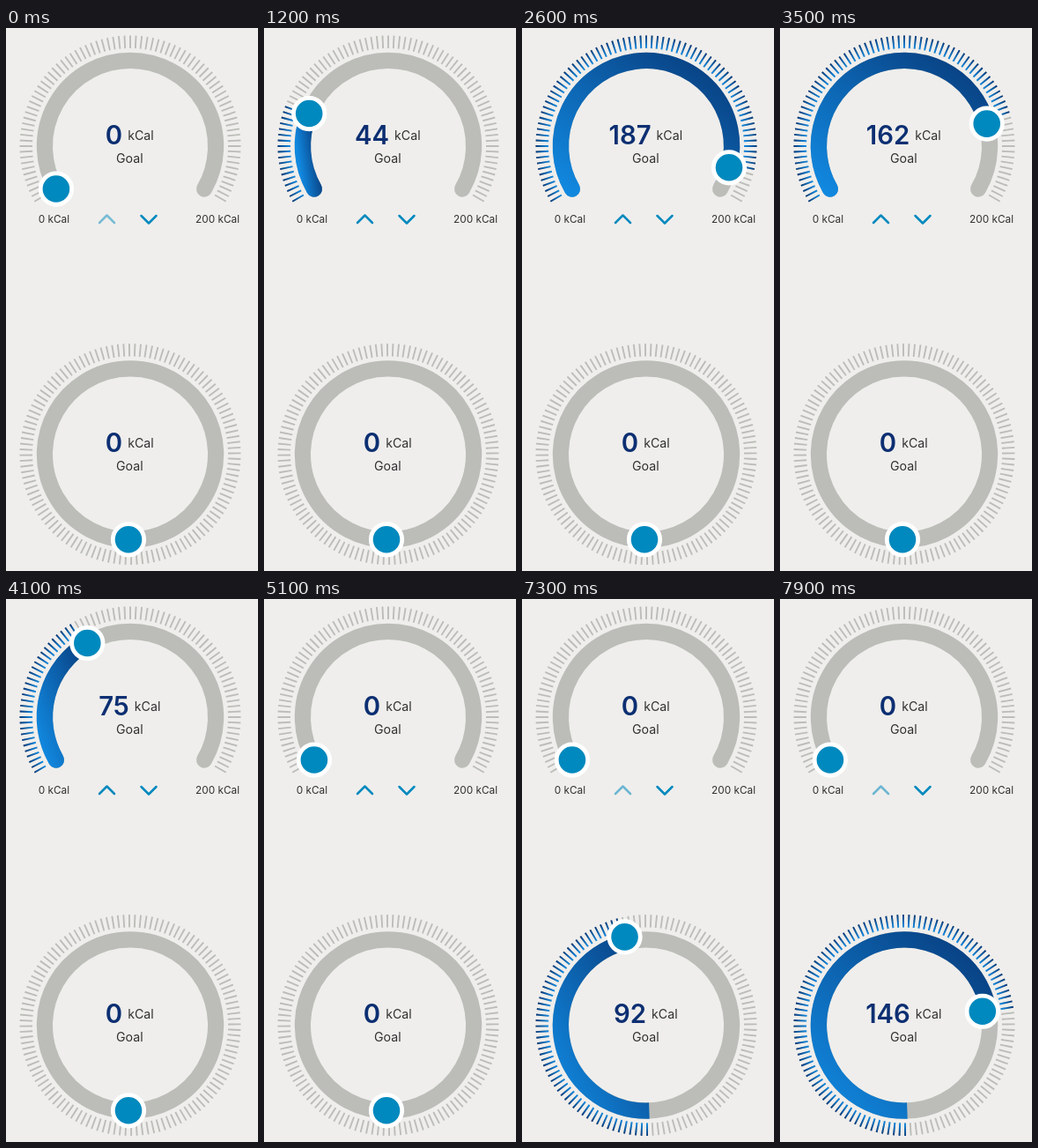
An HTML page for the animation above (8000 ms loop, 286x616 px).

```html
<!DOCTYPE html>
<html lang="en">
<head>
<meta charset="utf-8">
<style>
  html, body { margin: 0; width: 100%; height: 100%; overflow: hidden; background: #efeeec; }
  svg { display: block; width: 286px; height: 616px; font-family: Inter, sans-serif; fill: none; }
  text { fill: #303030; }
  .track { stroke: #bcbdb9; stroke-width: 18.2; }
  .fill { stroke: url(#fill); stroke-width: 18.4; }
  .ticks { stroke: #bcbdb9; stroke-width: 1.9; }
  .lit { stroke-width: 1.9; }
  .knob { fill: #0089be; stroke: #fff; stroke-width: 4.8; }
  .value { font-size: 29.3px; font-weight: 600; fill: #0d2f72; }
  .unit, .label { font-size: 14.2px; }
  .limit { font-size: 11.8px; }
  .arrow { stroke: #0089be; stroke-width: 2.5; stroke-linecap: round; stroke-linejoin: round; }
</style>
</head>
<body>
<svg id="stage" viewBox="0 0 286 616">
  <defs>
    <linearGradient id="fill" x1="0" y1="1" x2="1" y2="0">
      <stop stop-color="#1189e0"/><stop offset="1" stop-color="#083a7a"/>
    </linearGradient>
  </defs>
  <text class="limit" x="36.7" y="221">0 kCal</text>
  <text class="limit" x="265" y="221" text-anchor="end">200 kCal</text>
  <path id="up" class="arrow" d="M106 221l8.5-8.5 8.5 8.5"/>
  <path id="down" class="arrow" d="M153.5 213l8.5 8.5 8.5-8.5"/>
</svg>
<script>
const LOOP = 8000, MAX = 200, CX = 141, RADIUS = 97.1, TICK_STEP = 3;
const stage = document.getElementById('stage');
const up = document.getElementById('up'), down = document.getElementById('down');

function add(tag, attrs, parent = stage, text = '') {
  const node = document.createElementNS('http://www.w3.org/2000/svg', tag);
  for (const key in attrs) node.setAttribute(key, attrs[key]);
  node.textContent = text;
  parent.append(node);
  return node;
}

// Linear interpolation through [time, value] pairs.
function track(keys, t) {
  const i = keys.findIndex(key => key[0] > t);
  if (i === 0) return keys[0][1];
  if (i < 0) return keys[keys.length - 1][1];
  const [t0, v0] = keys[i - 1], [t1, v1] = keys[i];
  return v0 + (v1 - v0) * (t - t0) / (t1 - t0);
}

function point(cx, cy, rx, ry, degrees) {
  const a = degrees * Math.PI / 180;
  return [cx + rx * Math.cos(a), cy + ry * Math.sin(a)];
}

function createGauge({ id, cy, start, sweep, fillStart, tickStart, tickCount, cap, knob }) {
  const at = (r, degrees) => point(CX, cy, r, r, degrees).join(' ');
  const arc = (from, span) =>
    `M${at(RADIUS, from)}A${RADIUS} ${RADIUS} 0 ${span > 180 ? 1 : 0} 1 ${at(RADIUS, from + span)}`;
  const ticks = count => Array.from({ length: count }, (_, i) => {
    const a = tickStart + i * TICK_STEP;
    return `M${at(111, a)}L${at(125.5, a)}`;
  }).join('');

  const glow = add('radialGradient', {
    id, gradientUnits: 'userSpaceOnUse', cx: CX, cy, r: 125.5
  }, stage.querySelector('defs'));
  add('stop', { offset: .89, 'stop-color': '#1189e0' }, glow);
  add('stop', { offset: 1, 'stop-color': '#083a7a' }, glow);

  add('path', { class: 'ticks', d: ticks(tickCount) });
  const lit = add('path', { class: 'lit', stroke: `url(#${id})` });
  add('path', { class: 'track', 'stroke-linecap': cap, d: arc(start, Math.min(sweep, 359.99)) });
  const fill = add('path', { class: 'fill', 'stroke-linecap': cap });
  const handle = add('circle', { class: 'knob', r: 17.7 });
  const line = add('text', { x: CX - .7, y: cy - 2.3, 'text-anchor': 'middle' });
  const number = add('tspan', { class: 'value' }, line);
  add('tspan', { class: 'unit', dx: 6, dy: -5.2 }, line, 'kCal');
  add('text', { class: 'label', x: CX - .7, y: cy + 18.5, 'text-anchor': 'middle' }, stage, 'Goal');

  return value => {
    const span = sweep * value / MAX;
    const litCount = value > 0 ? Math.min(tickCount, Math.floor(span / TICK_STEP) + 1) : 0;
    lit.setAttribute('d', ticks(litCount));
    fill.setAttribute('d', value > 0 ? arc(fillStart, start + span - fillStart) : '');
    const [x, y] = point(knob.cx, knob.cy, knob.rx, knob.ry, start + span);
    handle.setAttribute('cx', x);
    handle.setAttribute('cy', y);
    number.textContent = Math.round(value);
  };
}

const drawArc = createGauge({
  id: 'arcTicks', cy: 134, start: 150, sweep: 240, fillStart: 150,
  tickStart: 150, tickCount: 81, cap: 'round',
  knob: { cx: CX, cy: 134, rx: RADIUS, ry: RADIUS }
});
const drawRing = createGauge({
  id: 'ringTicks', cy: 483.5, start: 90, sweep: 360, fillStart: 88,
  tickStart: 89.5, tickCount: 120, cap: 'butt',
  knob: { cx: 139, cy: 480.3, rx: 91.5, ry: 100 }
});

const arcKeys = [[900, 0], [1300, 58], [1700, 118], [1800, 124], [2200, 153], [2600, 187],
  [2700, 194], [2850, 200], [3200, 200], [3600, 150], [4100, 75], [5000, 5], [5100, 0]];
const ringKeys = [[5900, 0], [6400, 20], [6800, 45], [7300, 92], [7700, 135], [7900, 146]];
const upKeys = [[900, .5], [1100, 1], [5100, 1], [5500, .55]];
const downKeys = [[2800, 1], [3100, .5], [3200, .5], [3400, 1]];

function frame(now) {
  const t = now % LOOP;
  drawArc(track(arcKeys, t));
  drawRing(track(ringKeys, t));
  up.setAttribute('opacity', track(upKeys, t));
  down.setAttribute('opacity', track(downKeys, t));
  requestAnimationFrame(frame);
}
requestAnimationFrame(frame);
</script>
</body>
</html>
```
